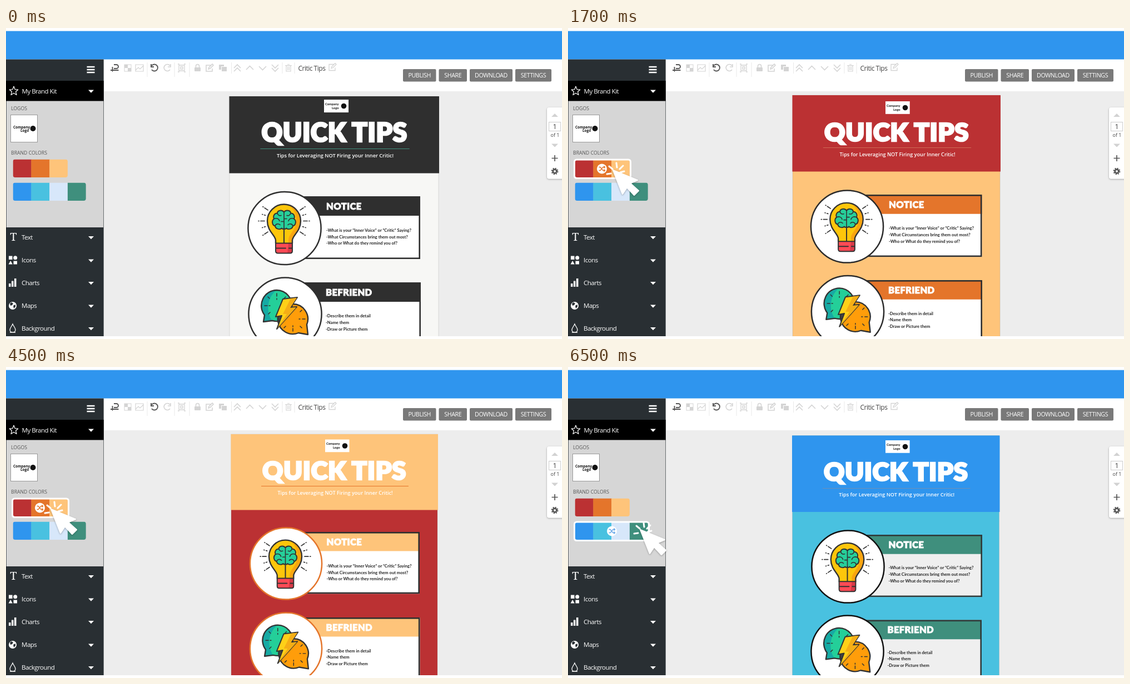
Recreate the animation shown at these times as an HTML page. Size 1000 px wide and 560 px high, loop 8000 ms.

```html
<!DOCTYPE html>
<html lang="en">
<head>
<meta charset="utf-8">
<title>Brand kit editor</title>
<style>
  html, body { margin: 0; width: 100%; height: 100%; overflow: hidden; background: #fff; }
  svg { display: block; width: 1000px; height: 560px; }
  text { font-family: "Open Sans", "Noto Sans", sans-serif; }
  .menu { font-size: 11.5px; letter-spacing: -.5px; fill: #fff; }
  .small { font-size: 8.7px; fill: #555; }
  .button { font-size: 10.7px; letter-spacing: -.4px; fill: #fff; text-anchor: middle; }
  .logo { font: 700 6.4px Lato, sans-serif; fill: #111; }
  .title { font: 900 46.5px Lato, sans-serif; letter-spacing: .4px; fill: #fff; stroke: #fff; stroke-width: 2.6px; text-anchor: middle; }
  .sub { font-size: 9.2px; font-weight: 600; fill: #fff; text-anchor: middle; }
  .head { font: 900 16.6px Lato, sans-serif; letter-spacing: .3px; fill: #fff; stroke: #fff; stroke-width: .8px; }
  .tip { font: 700 7.6px Lato, sans-serif; fill: #222; }
  .tools { fill: none; stroke: #d4d4d4; stroke-width: 1.6; }
  .dark { stroke: #555; }
  .solid { fill: #d4d4d4; stroke: none; }
  .ink { fill: none; stroke: #333; stroke-width: 2.4; stroke-linecap: round; stroke-linejoin: round; }
</style>
</head>
<body>
<svg viewBox="0 0 1000 560">
  <defs>
    <filter id="shade" x="-30%" y="-30%" width="160%" height="160%">
      <feDropShadow dx="0" dy="1" stdDeviation="1.5" flood-opacity=".35"/>
    </filter>

    <g id="bulb">
      <path d="M-16 27V22C-16 13-31 6-31-13A30 30 0 0 1 29-13C29 6 14 13 14 22V27Z" fill="#fdc60b"/>
      <path d="M6-42A30 30 0 0 1 29-13C29 6 14 13 14 22V27H7V20C8 10 21 3 21-13C21-27 15-37 6-42Z" fill="#f9a510"/>
      <path class="ink" d="M-16 27V22C-16 13-31 6-31-13A30 30 0 0 1 29-13C29 6 14 13 14 22V27"/>
      <path class="ink" d="M-1 0V27" style="stroke-width:2"/>
      <path class="ink" style="fill:#26cf9a;stroke-width:2" d="M-1-29C-5-34-13-32-13-27C-19-27-21-21-19-17C-24-13-22-5-17-4C-16 2-8 3-5 0C-4 2-2 2-1 0C0 2 2 2 3 0C6 3 14 2 15-4C20-5 22-13 17-17C19-21 17-27 11-27C11-32 3-34-1-29Z"/>
      <path class="ink" style="stroke-width:1.6" d="M-1-29V0M-13-27C-12-23-9-22-6-23M-19-17C-14-19-10-17-9-13M-17-4C-16-8-11-9-8-6M-1-12H-6M11-27C10-23 7-22 4-23M17-17C12-19 8-17 7-13M15-4C14-8 9-9 6-6M-1-17H4"/>
      <path d="M-16 27H14V41Q14 45 10 45H-12Q-16 45-16 41Z" fill="#ff4a55"/>
      <path d="M7 27H14V41Q14 45 10 45H5Z" fill="#d93a48"/>
      <path class="ink" style="stroke-width:2" d="M-16 27H14V41Q14 45 10 45H-12Q-16 45-16 41ZM-16 36H2M8 36H14"/>
      <path id="rays" class="ink" style="stroke-width:1.7"/>
    </g>

    <g id="talk">
      <path d="M14-18A27 27 0 0 1 39 19L41 37L24 34A27 27 0 1 1 14-18Z" fill="#ff9d0a"/>
      <path d="M-15-43A28 28 0 1 1-23 12L-39 14L-37 2A28 28 0 0 1-15-43Z" fill="#24cf99"/>
      <path d="M-15-43A28 28 0 0 0-37 2L-39 14L-23 12C-34 0-34-30-15-43Z" fill="#16aaa4"/>
      <path d="M-12.8 12.9A28 28 0 0 0 12.8-18.1A27 27 0 0 0-12.8 12.9Z" fill="#434343"/>
      <path class="ink" d="M14-18A27 27 0 0 1 39 19L41 37L24 34A27 27 0 1 1 14-18Z"/>
      <path class="ink" d="M-15-43A28 28 0 1 1-23 12L-39 14L-37 2A28 28 0 0 1-15-43Z"/>
      <path class="ink" style="stroke-width:1.5" d="M-15-37V-32M-31-31L-28-28M-37-15H-32M-29-15H-27M-30 0L-27-3M1-31L-2-28M-15-28V-26M36 9H31M27 9H25M30-7L27-4M30 25L27 22M14 31V26M14 23V21M-2 25L1 22"/>
      <path class="ink" style="fill:#fed018;stroke-width:2" d="M-4-27L22-30L10-12L21-13L-15 27L-6 3L-17 5Z"/>
      <path d="M21-29L9-11L20-12L-14 26L3 0L-4 0L10-28Z" fill="#f5ae16"/>
    </g>

    <g id="pointer">
      <path d="M81 256L125 274L112 279.500L127 293L119 301L106 287L98 299Z" fill="#fff" stroke="#fff" stroke-width="2" stroke-linejoin="round" filter="url(#shade)"/>
      <path d="M70 263L77 262M74 249L80 254M87 243L88 251M99 248L93 254M94 260L101 258" fill="none" stroke="#fff" stroke-width="3" stroke-linecap="round"/>
    </g>

    <path id="pencil" d="M3-5H-6V6H5V1M-2 2L-1-1L5-7L7-5L1 1Z"/>
  </defs>

  <rect width="1000" height="560" fill="#fff"/>
  <rect y="114" x="176" width="824" height="441" fill="#ededed"/>
  <g id="posters"></g>
  <rect y="555" width="1000" height="5" fill="#fff"/>
  <rect y="5.500" width="1000" height="51" fill="#2f95ee"/>

  <!-- toolbar -->
  <g class="tools">
    <path class="dark" d="M191.500 70V78.500M188 76H202.500M194 66H198.500A3.500 3.500 0 0 1 198.500 73H194" stroke-width="1.900"/>
    <rect x="213" y="66" width="12" height="12" stroke-width="1"/>
    <path class="solid" d="M213 66h6v6h-6zM219 72h6v6h-6z"/>
    <path d="M233 66H247V78H233ZM233 76L238 71L241 74L247 68" stroke-width="1.200"/>
    <path class="dark" d="M262 68A6 6 0 1 1 262 75M261 65V70H266" stroke-width="1.900"/>
    <path d="M295 68A6 6 0 1 0 295 75M296 65V70H291"/>
    <path d="M311 67H321V77H311ZM314 70h4v4h-4zM309 65h3M320 65h3M309 79h3M320 79h3" stroke-width="1.300"/>
    <rect class="solid" x="339" y="71" width="11" height="7" rx="1"/>
    <path d="M341.500 71V68.500A3 3 0 0 1 347.500 68.500V71"/>
    <use href="#pencil" x="366" y="72"/>
    <path class="solid" d="M383 66h9v3h-5v6h-4zM388 70h9v8h-9z"/>
    <path d="M410 72L416 66L422 72M410 78L416 72L422 78M432 75L438.500 68.500L445 75M455 69L461.500 75.500L468 69M478 66L484 72L490 66M478 72L484 78L490 72"/>
    <path d="M504 68H512V78H504ZM502 67.500H514M506 65.500H510M506.700 70V76M509.300 70V76" stroke-width="1.200"/>
    <use href="#pencil" x="587" y="70.500" stroke-width="1.300"/>
    <path d="M254 62V88M303 62V88M330 62V88M405.500 62V82M497 62V82M519 62V82" stroke="#e9e9e9" stroke-width="1"/>
  </g>
  <text x="525.500" y="76.500" style="font-size:12px;letter-spacing:-.5px" fill="#444">Critic Tips</text>
  <g id="buttons"></g>

  <!-- page panel -->
  <rect x="973" y="143" width="34" height="128.500" rx="4" fill="#fff" filter="url(#shade)"/>
  <path d="M981 160L987 154L993 160ZM981 208.500L987 214.500L993 208.500Z" fill="#d2d2d2"/>
  <rect x="976.500" y="169.500" width="21" height="16" fill="#fff" stroke="#ccc"/>
  <text x="987" y="182" font-size="12.500" text-anchor="middle" fill="#444">1</text>
  <text x="987.500" y="195.500" font-size="9" text-anchor="middle" fill="#444">of 1</text>
  <path d="M981.500 234.500H992.500M987 229V240" stroke="#555" stroke-width="1.700"/>
  <circle cx="987" cy="258" r="5.200" fill="none" stroke="#555" stroke-width="2.400" stroke-dasharray="2.040"/>
  <circle cx="987" cy="258" r="3.300" fill="none" stroke="#555" stroke-width="2.700"/>

  <!-- sidebar -->
  <rect y="56.500" width="175.700" height="498.500" fill="#292f33"/>
  <rect y="95" width="175.700" height="36.500" fill="#000"/>
  <rect x=".700" y="131.500" width="174.300" height="227.500" fill="#d6d6d6"/>
  <path d="M145.500 70H159.500M145.500 75H159.500M145.500 80H159.500" stroke="#fff" stroke-width="2.500"/>
  <path d="M14 105L16.200 110.700L21.800 111L17.500 114.700L19 120.500L14 117.300L9 120.500L10.500 114.700L6.200 111L11.800 110.700Z" fill="none" stroke="#fff" stroke-width="1.200" stroke-linejoin="round"/>
  <text class="menu" x="28.500" y="117.500">My Brand Kit</text>
  <text class="small" x="9" y="147.500">LOGOS</text>
  <text class="small" x="9" y="227.500">BRAND COLORS</text>
  <rect x="8.500" y="156.500" width="48" height="49" fill="#fff" stroke="#999"/>
  <g class="logo"><text x="13" y="180.500">Company</text><text x="26" y="186.500">Logo</text></g>
  <circle cx="48.500" cy="181" r="5" fill="#111"/>
  <text x="13.500" y="383" text-anchor="middle" fill="#fff" style="font:20px 'Noto Serif',serif">T</text>
  <path d="M5 410.500h6.500v6.500h-6.500zM13.500 419.500h6.500v6h-6.500zM8.200 419L11.800 425.500H4.600ZM5 460h3.500v6h-3.500zM10 455.500h3.500v10.500h-3.500zM15 451h3.500v15h-3.500z" fill="#fff"/>
  <circle cx="16.700" cy="413.700" r="3.500" fill="#fff"/>
  <circle cx="12" cy="500" r="7" fill="#fff"/>
  <path d="M7 496L10 494L13 496L11 499L8 500ZM13 500L17 498L17 502L14 505Z" fill="#292f33"/>
  <path d="M12 533C13.500 537 17 540 17 543.500A5 4.500 0 0 1 7 543.500C7 540 10.500 537 12 533ZM7 548H17" fill="none" stroke="#fff" stroke-width="1.300"/>
  <g id="menu"></g>
  <g id="swatches"></g>
  <g id="picks"></g>
</svg>
<script>
const $ = id => document.getElementById(id);
const red = '#bb3133', orange = '#e4752b', peach = '#fec47a', coal = '#2f2f2f';
const blue = '#2f95ee', aqua = '#49c1e0', pale = '#d7e7fa', green = '#3f8f7d';

const rect = (x, y, w, h, fill, more = '') =>
  `<rect x="${x}" y="${y}" width="${w}" height="${h}" fill="${fill}" ${more}/>`;
const label = (cls, x, y, text, more = '') =>
  `<text class="${cls}" x="${x}" y="${y}" ${more}>${text}</text>`;

// page: x, top, width, header bottom; card: circle x, y, radius, right, top, text x, first tip
const scenes = [
  { at: 0, pick: -1, page: [401.5, 123, 377.5, 261.5], logo: [572, 129], mid: 590.5, title: 205, rule: 217.5, sub: 232.8,
    cards: [[501, 360.5, 66.5, 745, 303, 576, 366.6], [502, 515, 66.5, 746, 458, 575, 521]],
    paint: { top: coal, body: '#f7f7f5', rule: green, head: coal, card: '#fff', edge: coal, ring: coal } },
  { at: 500, pick: 0, page: [403.5, 121, 374.5, 258.5], logo: [571, 132], mid: 591, title: 203.5, rule: 215.5, sub: 230.7,
    cards: [[502, 357.5, 66, 744.5, 300, 577, 363], [503, 511, 66, 745, 454, 576, 516.5]],
    paint: { top: red, body: peach, rule: '#cf6a55', head: orange, card: '#fff', edge: coal, ring: '#2b2b2b' } },
  { at: 2500, pick: 0, page: [408, 122, 370.5, 258], logo: [574, 130.5], mid: 593.5, title: 203.5, rule: 0, sub: 230.4,
    cards: [[507, 355, 65, 746, 298, 580, 360], [506.5, 506, 65, 746, 450, 578, 511]],
    paint: { top: orange, body: '#efefef', head: red, card: peach, edge: '#333', ring: '#111' } },
  { at: 4500, pick: 0, page: [404.5, 121, 372.5, 257.5], logo: [574, 130.5], mid: 590.5, title: 202.5, rule: 214.5, sub: 229.5,
    cards: [[503.5, 354, 65.5, 744, 297, 576.5, 361], [503.5, 507, 65.5, 744.5, 451, 575.5, 513.5]],
    paint: { top: peach, body: red, rule: orange, head: peach, card: '#fff', edge: coal, ring: orange } },
  { at: 6500, pick: 1, page: [403, 123.5, 373.5, 261], logo: [571, 132], mid: 589.7, title: 205, rule: 218.5, sub: 233.4,
    cards: [[503.5, 359.5, 66, 745, 302, 576.5, 364.2], [502.5, 512.5, 66, 744, 455.5, 574.5, 516.5]],
    paint: { top: blue, body: aqua, rule: '#6d8fb5', head: green, card: '#efefef', edge: '#2f3a3a', ring: '#111' } },
];
const LOOP = 8000;

const tips = [
  ['NOTICE', 'bulb', '-What is your “Inner Voice” or “Critic” Saying?', '-What Circumstances bring them out most?', '-Who or What do they remind you of?'],
  ['BEFRIEND', 'talk', '-Describe them in detail', '-Name them', '-Draw or Picture them'],
];

function card([cx, cy, r, right, top, tx, first], [name, art, ...lines], p) {
  const k = r / 66.5, x = cx + 20, w = right - x, h = 113 * k;
  return rect(x, top, w, h, p.card) + rect(x, top, w, 35 * k, p.head) +
    rect(x + 1.3, top + 1.3, w - 2.6, h - 2.6, 'none', `stroke="${p.edge}" stroke-width="2.6"`) +
    label('head', tx, top + 23.5, name) +
    lines.map((line, i) => label('tip', tx, first + i * 11.9 * k, line)).join('') +
    `<circle cx="${cx}" cy="${cy}" r="${r - .9}" fill="#fff" stroke="${p.ring}" stroke-width="2.5"/>` +
    `<use href="#${art}" transform="translate(${cx} ${cy}) scale(${k})"/>`;
}

function poster({ page: [x, top, w, fold], logo: [lx, ly], mid, title, rule, sub, cards, paint }) {
  const k = w / 377;
  return rect(x + .5, top, w - 1.5, 560 - top, paint.body, 'stroke="#999" stroke-opacity=".3"') +
    rect(x, top, w, fold - top, paint.top) +
    rect(lx, ly, 44 * k, 23 * k, '#fff') +
    label('logo', lx + 2, ly + 9.5, 'Company', 'style="font-size:5.8px"') +
    label('logo', lx + 14, ly + 16.5, 'Logo', 'style="font-size:5.8px"') +
    `<circle cx="${lx + 35.5}" cy="${ly + 11.5}" r="4.8" fill="#111"/>` +
    label('title', mid, title, 'QUICK TIPS', `style="font-size:${46.5 * k}px"`) +
    (rule ? rect(mid - 133 * k, rule - .5, 268 * k, 1, paint.rule) : '') +
    label('sub', mid + 1.5, sub, 'Tips for Leveraging NOT Firing your Inner Critic!', `style="font-size:${9.2 * k}px"`) +
    cards.map((c, i) => card(c, tips[i], paint)).join('');
}

// outline, shuffle badge and pointer on the chosen palette
function pick(row) {
  if (row < 0) return '';
  const [x, y, w, tint, dx, dy] = row ? [79, 295.5, 134, '#6aa8e8', 49, 37] : [61, 253.5, 101, orange, 0, 0];
  return rect(11.5, y - 16.5, w, 33.5, 'none', 'rx="4" stroke="#fff" stroke-width="3"') +
    `<circle cx="${x}" cy="${y}" r="9" fill="#fff"/>
     <path transform="translate(${x} ${y})" fill="none" stroke="${tint}" stroke-width="1.4"
       d="M-5.500-3H-3L2 3H5M-5.500 3H-3L2-3H5M3.500-5L5.500-3L3.500-1M3.500 1L5.500 3L3.500 5"/>
     <use href="#pointer" x="${dx}" y="${dy}"/>`;
}

function palette(y, colors, id) {
  const step = 32.8;
  return `<clipPath id="${id}">${rect(12.5, y, colors.length * step, 32.5, '#000', 'rx="4"')}</clipPath>
    <g clip-path="url(#${id})">${colors.map((c, i) => rect(12.5 + i * step, y, step + .5, 32.5, c)).join('')}</g>`;
}

const caret = y => `<path d="M148 ${y - 2.5}H158L153 ${y + 2.7}Z" fill="#fff"/>`;
$('menu').innerHTML = caret(114) +
  [['Text', 376.5], ['Icons', 418], ['Charts', 458.5], ['Maps', 500], ['Background', 540.5]]
    .map(([name, y]) => label('menu', 28, y + 4.2, name) + caret(y + 1)).join('');

$('buttons').innerHTML = [['PUBLISH', 714, 59.5], ['SHARE', 778.5, 50.5], ['DOWNLOAD', 834, 77], ['SETTINGS', 916, 65]]
  .map(([name, x, w]) => rect(x, 74, w, 22.5, '#797979', 'rx="2"') + label('button', x + w / 2, 89, name)).join('');

$('swatches').innerHTML = palette(236.5, [red, orange, peach], 'warm') + palette(278.5, [blue, aqua, pale, green], 'cool');

const spokes = [];
for (const side of [-1, 1]) {
  for (const deg of [-34, -17, 0, 17, 34]) {
    const c = side * Math.cos(deg * Math.PI / 180), s = Math.sin(deg * Math.PI / 180);
    const at = r => `${(-1 + r * c).toFixed(1)} ${(-13 + r * s).toFixed(1)}`;
    const far = deg % 34 ? 40 : 45;
    spokes.push(`M${at(35)}L${at(far - 3)}M${at(far)}L${at(far + 1)}`);
  }
}
$('rays').setAttribute('d', spokes.join(''));

$('posters').innerHTML = scenes.map(s => `<g>${poster(s)}</g>`).join('');
$('picks').innerHTML = scenes.map(s => `<g>${pick(s.pick)}</g>`).join('');

const layers = ['posters', 'picks'].map(id => [...$(id).children]);
const start = performance.now();
function draw() {
  const t = (performance.now() - start) % LOOP;
  const now = scenes.findLastIndex(s => t >= s.at);
  for (const layer of layers) layer.forEach((g, i) => { g.style.display = i === now ? '' : 'none'; });
  requestAnimationFrame(draw);
}
draw();
</script>
</body>
</html>
```
